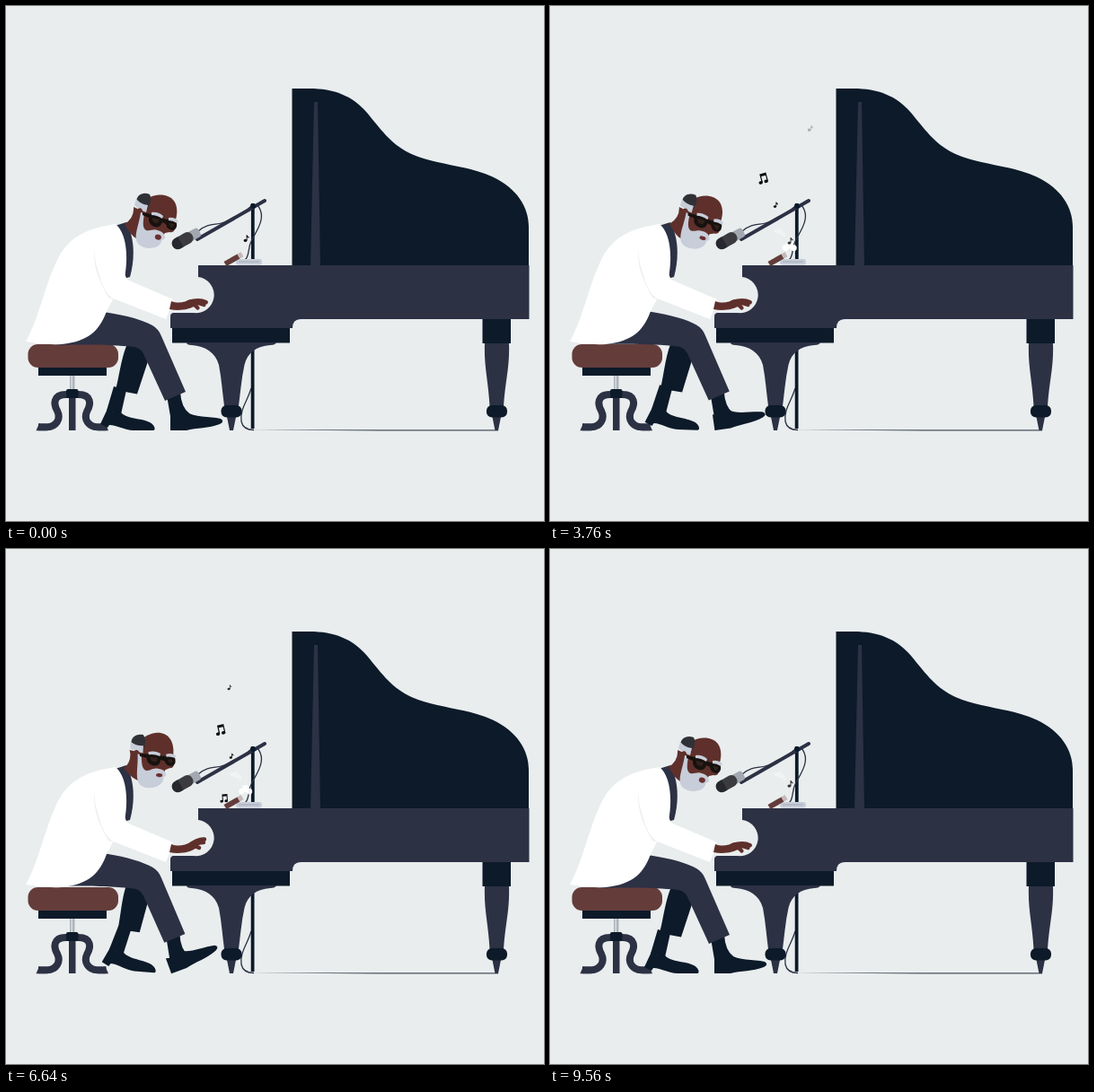
An HTML page that plays this animation: 599x574 px, repeating every 9.6 s.

```html
<!DOCTYPE html>
<html lang="en">
<head>
<meta charset="utf-8">
<title>Pianist</title>
<style>
html, body { margin: 0; width: 100%; height: 100%; overflow: hidden; background: #e9edee; }
svg { display: block; width: 100%; height: 100%; }
.ink { fill: #0c1a29; }
.navy { fill: #2c3144; }
.skin { fill: #5f302b; }
.grey { fill: #c7cdd9; }
.white { fill: #fff; }
.line { fill: none; stroke: #2c3144; }
.cable { fill: none; stroke: #2c3144; stroke-width: 1.3; }
.finger { fill: none; stroke: #5f302b; stroke-width: 4.4; stroke-linecap: round; stroke-linejoin: round; }
</style>
</head>
<body>
<svg viewBox="0 0 599 574" preserveAspectRatio="none">
  <defs>
    <g id="pair">
      <ellipse cx="-3.2" cy="4" rx="2.2" ry="1.8"/>
      <ellipse cx="3" cy="4" rx="2.2" ry="1.8"/>
      <path d="M-2.2 4V-5.5H5.2V4H4V-2.5H-1V4Z"/>
    </g>
    <g id="single">
      <ellipse cx="-1" cy="2" rx="1.8" ry="1.5"/>
      <path d="M0 2V-3.5H.9Q1.1 -2.2 2.8 -1.4V-.4L.9 -1.2V2Z"/>
    </g>
    <g id="puffA">
      <circle cx="-4" cy="0" r="2.2"/><circle cx="0" cy="-1" r="3.2"/>
      <circle cx="4" cy="0" r="2.2"/><circle cx="6" cy="2" r="1.5"/>
    </g>
    <g id="puffB">
      <circle cx="-4" cy="1" r="3"/><circle cx="0" cy="-2" r="3.8"/><circle cx="4" cy="1" r="3"/>
    </g>
    <path id="stoolLeg" class="line" stroke-width="8" d="M72 433H67C52 433 53 444 57 451C62 461 55 469 46 469.300H36"/>
  </defs>

  <!-- stand, piano -->
  <path class="cable" d="M273 426C269 440 260 450 262 463Q264 472.500 276 472.500"/>
  <path fill="#4a505d" d="M270 472.300H548V473.400H415Z"/>
  <path class="ink" d="M272.700 370h3.800v101h-3.800z"/>
  <path class="ink" d="M318.500 92H338C365 92 386 100 402 119C420 141 430 155 452 165.300C480 177.500 512 177 542 190.500C569 203.500 582 224 582 246V290H318.500Z"/>
  <path class="navy" d="M343 107h4l3 183h-11z"/>
  <path class="navy" d="M214 289H582.500V349H328Q319 349 319 359H183V346Q183 342.500 186 342H209A20 20 0 0 0 214 302Z"/>
  <path class="ink" d="M185 359H316V375.500H185ZM530.500 349H562V376H530.500Z"/>
  <path class="navy" d="M201 375H301Q300 378 294 378C279 379 269 386 265.500 400C262 416 261 431 259 446H243C241 431 240 416 237 400C233 386 222 379 207 378Q201 378 201 375ZM533 376H560C561 402 556 417 554 446H538.500C537 417 532 402 533 376ZM246 458h10l-3 15h-4zM541.500 458h9.500l-3 15h-3.500z"/>
  <rect class="ink" x="239.500" y="445" width="23" height="13.500" rx="6"/>
  <rect class="ink" x="535" y="445" width="23" height="13.500" rx="6"/>

  <!-- microphone -->
  <path class="ink" d="M272.900 220h3.800v64h-3.800z"/>
  <path class="cable" d="M214 251C228 239 236 247 249 238C258 233 264 232 273 223"/>
  <path class="cable" d="M280 222C290 234 281 248 274 260C268 271 272 278 266 283"/>
  <path class="line" stroke-width="4" stroke-linecap="round" d="M213 260L288 217"/>
  <circle class="ink" cx="275" cy="223" r="3"/>
  <g transform="translate(200.500 259.500) rotate(-29)">
    <rect x="3" y="-5.500" width="14" height="11" rx="3" fill="#a3a7b0"/>
    <rect x="-17" y="-6.500" width="25" height="13" rx="6" fill="#3b3b40"/>
    <path fill="#27282d" d="M-7 -6.500h-3.500a6.500 6.500 0 0 0 0 13H-7z"/>
  </g>
  <rect class="grey" x="256" y="282" width="29" height="6.500" rx="3"/>
  <path fill="#a3a7b0" d="M259 284.500h23v1h-23z"/>
  <path fill="none" stroke="#643d3b" stroke-width="6" d="M244 287.500L259 279"/>
  <path fill="none" stroke="#c5b9b8" stroke-width="6" d="M259 279L263 276.700"/>

  <!-- stool -->
  <path fill="#aeb3bd" d="M71 411h5.500v20H71z"/>
  <path fill="#d9dde2" d="M72.500 411h1.500v20h-1.500z"/>
  <use href="#stoolLeg"/>
  <use href="#stoolLeg" transform="matrix(-1 0 0 1 147.500 0)"/>
  <path class="navy" d="M70 430h7.500v43H70zM37 465.300L33.500 473.300H46zM110.500 465.300L114 473.300H102z"/>
  <rect class="ink" x="67" y="427" width="13.500" height="10" rx="2"/>
  <path class="ink" d="M36 402h76v10H36z"/>
  <rect x="24.500" y="377" width="100.500" height="26" rx="11" fill="#643d3b"/>

  <!-- far leg -->
  <g id="farFoot" class="ink">
    <path d="M120 424L134 428L128 455L112 451Z"/>
    <path d="M113 449Q121 455 127 452C134 461 151 459 160 464C166 467 167 473 164 473H142C132 473 124 467 115 467L113 470L105 466Z"/>
  </g>
  <path id="farLeg" class="ink" d="M134 379C128 394 126 413 122 428L146 432.500L158 396L153 379Z"/>

  <!-- near leg -->
  <path id="nearFoot" class="ink" d="M183 455Q190 458 201 452C209 459 226 457 239 460Q244 463 238 466C226 471 212 470 201 473H183Z"/>
  <g id="nearLeg">
    <path class="ink" d="M179 434L194 430Q195 447 204 454L198 462L184 463Z"/>
    <path class="navy" d="M56 378L90 352L112 341.500C135 345 152 350 163 356Q170 360 173 368L200 430L177 440L155 392Q151 381 143 380C120 378 100 377 56 378Z"/>
  </g>

  <!-- body -->
  <path class="navy" d="M118 246L134 241C143 258 144 280 138 302L124 306Z"/>
  <path class="white" d="M22 374C37 348 43 310 59 279C72 255 95 247 122 243C133 252 137 276 132 303L112 340C105 360 93 374 62 377Q42 378 22 374Z"/>
  <path fill="#edf0f1" d="M99 266C95 286 103 306 114 325L124 328L107 302Z"/>
  <path class="white" d="M99 263C102 245 130 248 131 270C132 289 130 302 137 306L186 327Q183 338 178 349L122 327C112 324 107 311 104 300C99 285 97 272 99 263Z"/>
  <path class="skin" d="M184 329C192 332 199 330 206 327L212 333C204 339 192 340 182 338Z"/>
  <g id="hand">
    <path class="finger" d="M203 331Q213 323 221 323.500"/>
    <path class="finger" d="M204 332Q213 327 220 327"/>
    <path class="finger" d="M203 333Q210 330 215 333"/>
  </g>

  <!-- head -->
  <g id="head">
    <path class="skin" d="M132 243Q143 236 142 224L160 232L145 259Q139 256 132 243Z"/>
    <path class="skin" d="M149 229C151 215 163 210 174 210.500C188 212 193 223 189 238L188 248Q187 253 182 252L177 253L172 260L150 252Z"/>
    <path d="M145 219C145 210 153 207 160 210C163 216 160 222 157 227L147 223Z" fill="#303137"/>
    <path class="grey" d="M145 215Q150 221 158 222L156 230Q148 227 143 222Z"/>
    <ellipse class="skin" cx="148.500" cy="230" rx="3.500" ry="5" transform="rotate(15 148 230)"/>
    <path class="grey" d="M150 230L154 231C153 239 151 247 156 250C161 251 164 248 169 250Q177 252 177 259L173.500 261C172 271 155 273 147 265C141 258 148 245 150 230Z"/>
    <path fill="#17120f" d="M152 230L161 232Q174 235 176 237L190 241Q191 249 186 250Q179 250 178 243L174 241Q172 248 165 246Q158 243 159 236L152 233Z"/>
    <path fill="#4b3025" opacity=".5" d="M163 236L171 238Q170 243 167 242Q162 241 163 236ZM181 242L187 243Q187 247 184 247Z"/>
    <path class="grey" d="M162 230Q169 229 175 234L174 237Q168 233 162 233ZM181 236Q188 235 192 240L190 242Q186 239 181 239Z"/>
    <ellipse id="mouth" cx="169.500" cy="257.500" rx="3.600" ry="2.400" fill="#6a2f31" transform="rotate(15 169 257)"/>
  </g>

  <g id="smoke" class="white"></g>
  <g id="notes" fill="#0b0d10"></g>
</svg>
<script>
const LOOP = 9600;
const $ = id => document.getElementById(id);
const clamp = v => Math.max(0, Math.min(1, v));

// Eased value from [time, value] steps
function track(steps, t) {
  let i = 1;
  while (i < steps.length - 1 && t > steps[i][0]) i++;
  const [t0, a] = steps[i - 1], [t1, b] = steps[i];
  const p = clamp((t - t0) / (t1 - t0));
  return a + (b - a) * p * p * (3 - 2 * p);
}

const nod = [[0, 0], [600, -3], [1200, 1], [1800, -3], [2400, 2], [3100, -3], [3760, 2],
  [4560, -5], [5320, -3.5], [5960, -5], [6640, -10.5], [7460, -5], [8280, -3.5], [8900, 1], [9600, 0]];
const tap = [[0, 0], [520, 8], [1080, 0], [1360, 8], [1840, 20], [2340, 0], [2400, 0]];
const press = [[0, 1], [140, 1], [300, 0], [900, 0], [1150, 1], [1250, 1], [1420, 0], [1720, 0], [1820, 1], [1920, 1]];

// Every kind: births, life in ms, path, turn and size along p = 0..1
const kinds = [
  { id: "pair", births: [350, 2215, 4085, 5250, 6520], life: 2200,
    x: p => 242.500 - 16.500 * p ** 3, y: p => 285 - 132 * p,
    turn: p => -4 - 22 * p * p, size: p => Math.min(.65 + p * 3, 1, .75 + (1 - p) * 1.6) },
  { id: "single", births: [1520, 3415, 5290, 6430, 7830], life: 1550,
    x: p => 250.500 + 6 * p - 9 * p * p, y: p => 245 - 104 * p,
    turn: () => 0, size: p => .75 + .25 * Math.sin(p * Math.PI) },
  { id: "single", births: [-70, 1890, 3730, 9530], life: 1950,
    x: p => 267.500 + 24 * p ** 1.6, y: p => 264 - 133 * p,
    turn: p => 12 * p, size: p => 1.1 - .1 * p },
  { id: "puffA", smoke: true, births: [1300, 4220, 7140], life: 2900,
    x: p => 262 - 6.500 * Math.min(1, p * 2.6), y: p => 276 - 28 * p,
    turn: p => 20 * p, size: p => Math.min(1, .3 + p * 2) },
  { id: "puffB", smoke: true, births: [480, 3400, 6320], life: 2800,
    x: p => 266 + 6 * p, y: p => 275 - 51 * p,
    turn: p => 12 * p, size: p => Math.min(1.2, .5 + p * 5, 1.7 - p) },
  { id: "puffA", smoke: true, births: [980, 3900, 6820], life: 2200,
    x: p => 266 + 24 * Math.min(1, p * 1.6), y: p => 254 - 26 * p,
    turn: p => 30 * p, size: p => .15 + .45 * p }
];

const bits = kinds.flatMap(kind => kind.births.map(birth => {
  const el = document.createElementNS("http://www.w3.org/2000/svg", "use");
  el.setAttribute("href", "#" + kind.id);
  $(kind.smoke ? "smoke" : "notes").append(el);
  return { el, kind, birth };
}));

const spin = (id, angle, x, y, dx = 0, dy = 0) =>
  $(id).setAttribute("transform", `translate(${dx} ${dy}) rotate(${angle} ${x} ${y})`);

function draw(t) {
  const lift = track(tap, t % 2400);
  const k = lift / 20;
  spin("nearFoot", -lift, 184, 470);
  spin("nearLeg", k * .6, 100, 372, 0, -2 * k);
  spin("farFoot", k * 5, 160, 472, k, -k);
  spin("farLeg", -k * 3, 143, 380, 0, -5 * k);

  const angle = track(nod, t);
  spin("head", angle, 140, 248, Math.max(0, angle) * .5, 0);
  spin("hand", 24 * track(press, t % 1920), 206, 331);
  $("mouth").setAttribute("ry", 2.3 + .7 * Math.cos(t / LOOP * Math.PI * 24));

  for (const { el, kind, birth } of bits) {
    const p = (t - birth) / kind.life;
    const live = p >= 0 && p < 1;
    el.style.display = live ? "" : "none";
    if (!live) continue;
    el.setAttribute("transform",
      `translate(${kind.x(p)} ${kind.y(p)}) rotate(${kind.turn(p)}) scale(${kind.size(p)})`);
    el.style.opacity = kind.smoke
      ? Math.min(1, p * 8, (1 - p) * 2.2)
      : Math.min(1, .6 + p * 14, (1 - p) / .15);
  }
}

function tick() {
  draw(performance.now() % LOOP);
  requestAnimationFrame(tick);
}
tick();
</script>
</body>
</html>
```
